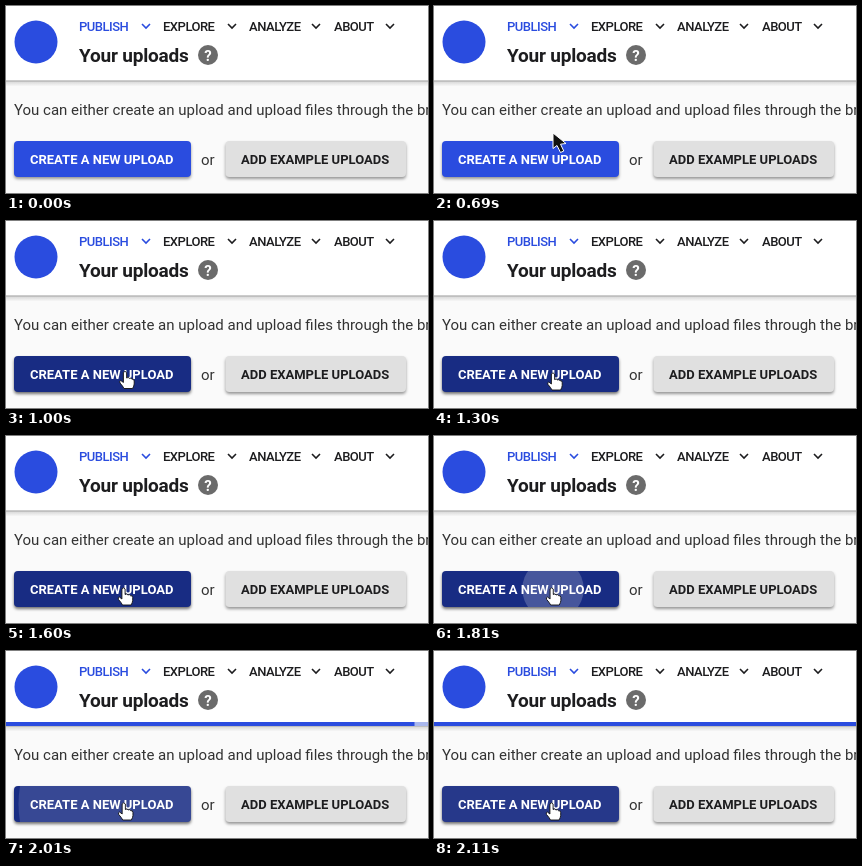
These frames come from a looping animation (422x187 px, 2.21 s). An HTML page:

```html
<!DOCTYPE html>
<html lang="en">
<head>
<meta charset="utf-8">
<style>
  html, body { margin: 0; width: 100%; height: 100%; overflow: hidden; background: #fafafa; }
  svg { display: block; width: 422px; height: 187px; }
  text { font-family: Roboto, "Open Sans", sans-serif; fill: #1d1d1f; }
  .nav { font-size: 13px; font-weight: 500; letter-spacing: -.5px; }
  .title { font-size: 19px; font-weight: 600; letter-spacing: -.2px; }
  .body { font-size: 15px; fill: #333; }
  .label { font-size: 13px; font-weight: 600; }
  .chevron { fill: none; stroke-width: 1.6; }
</style>
</head>
<body>
<svg viewBox="0 0 422 187">
  <defs>
    <filter id="soft" x="-20%" y="-40%" width="140%" height="200%"><feGaussianBlur stdDeviation="1.8"/></filter>
    <linearGradient id="headerShadow" x2="0" y2="1">
      <stop stop-color="#999"/><stop offset=".3" stop-color="#ddd"/><stop offset="1" stop-color="#fafafa"/>
    </linearGradient>
    <clipPath id="buttonClip"><rect x="8" y="135" width="177" height="36" rx="4"/></clipPath>
  </defs>

  <rect width="422" height="187" fill="#fafafa"/>
  <rect width="422" height="75" fill="#fff"/>
  <rect y="74.5" width="422" height="6" fill="url(#headerShadow)"/>
  <circle cx="30" cy="36" r="21.5" fill="#2a4cdf"/>
  <g id="menu"></g>
  <text class="title" x="73" y="56">Your uploads</text>
  <circle cx="202" cy="49" r="10" fill="#6b6b6b"/>
  <text x="202" y="54.5" text-anchor="middle" font-size="15" font-weight="700" style="fill:#fff">?</text>

  <g id="progress">
    <rect y="71" width="422" height="4" fill="#aab8ee"/>
    <rect id="bar" y="71" height="4" fill="#2a4cdf"/>
  </g>

  <text class="body" x="8" y="109">You can either create an upload and upload files through the browser</text>

  <rect id="shadow" x="8" y="137" width="177" height="36" rx="4" filter="url(#soft)"/>
  <rect id="button" x="8" y="135" width="177" height="36" rx="4"/>
  <circle id="ripple" cx="119" cy="153" fill="#fff" clip-path="url(#buttonClip)"/>
  <text class="label" x="24" y="158" style="fill:#fff">CREATE A NEW UPLOAD</text>

  <text class="body" x="195" y="159">or</text>
  <rect x="219.5" y="137" width="180.5" height="36" rx="4" fill-opacity=".4" filter="url(#soft)"/>
  <rect x="219.5" y="135" width="180.5" height="36" rx="4" fill="#e0e0e0"/>
  <text class="label" x="235" y="158">ADD EXAMPLE UPLOADS</text>

  <path id="arrow" d="M0 0V15.5L4 12.5 7.5 19.5 10.8 18 7.5 11.2 13 10.5Z" fill="#111" stroke="#fff" stroke-linejoin="round"/>
  <path id="hand" d="M-1.6 1.5Q0-.8 1.6 1.5V7Q3.4 5.7 4.4 7.4 6.2 6.5 7 8.2 9 7.6 9.2 10V13Q9 15 7.6 17.5H-1Q-3-14.8-1 17.5 -2.2 15-5 12 -6 10-4.2 9.5L-1.6 11.5Z" fill="#fff" stroke="#111" stroke-width=".9" stroke-linejoin="round"/>
</svg>
<script>
const $ = id => document.getElementById(id);
const LOOP = 2210;
const CHANGES = [0, 690, 790, 900, 1000, 1090, 1300, 1600, 1710, 1820, 1920, 2010, 2110];
const POINTER = [[690, 119, 127], [790, 119, 138], [900, 118, 147], [1000, 119, 150],
                 [1300, 119, 151.5], [1600, 117.5, 151.5], [1920, 118, 151.5], [2110, 117.5, 151.5]];
const IDLE = [42, 76, 223], HOVER = [24, 44, 131];

const clamp = v => Math.max(0, Math.min(1, v));
const mix = (a, b, k) => a + (b - a) * k;
const show = (id, on) => $(id).setAttribute("visibility", on ? "visible" : "hidden");
const set = (id, attributes) => {
  for (const name in attributes) $(id).setAttribute(name, attributes[name]);
};

$("hand").setAttribute("d",
  "M-1.6 1.5Q0-.8 1.6 1.5V7Q3.4 5.7 4.4 7.4 6.2 6.5 7 8.2 9 7.6 9.2 10V13Q9 15 7.6 17.5H-1Q-2.2 15-5 12-6 10-4.2 9.5L-1.6 11.5Z");

$("menu").innerHTML = [["PUBLISH", 73, 140], ["EXPLORE", 157, 226], ["ANALYZE", 243, 310], ["ABOUT", 328, 384]]
  .map(([word, x, chevron], i) => {
    const color = i ? "#1d1d1f" : "#2a4cdf";
    return `<text class="nav" x="${x}" y="25" style="fill:${color}">${word}</text>
      <path class="chevron" stroke="${color}" d="M${chevron - 4} 18l4 4 4-4"/>`;
  }).join("");

function pointerAt(t) {
  const next = POINTER.findIndex(p => p[0] > t);
  if (next < 0) return POINTER.at(-1).slice(1);
  if (next === 0) return POINTER[0].slice(1);
  const a = POINTER[next - 1], b = POINTER[next];
  const k = (t - a[0]) / (b[0] - a[0]);
  return [mix(a[1], b[1], k), mix(a[2], b[2], k)];
}

function draw(t) {
  const [x, y] = pointerAt(t);
  const transform = `translate(${x} ${y})`;
  set("arrow", { transform });
  set("hand", { transform });
  show("arrow", t >= 690 && t < 790);
  show("hand", t >= 790);

  const hover = clamp((t - 750) / 180);
  set("button", { fill: `rgb(${IDLE.map((c, i) => mix(c, HOVER[i], hover))})` });
  const pressed = t >= 1820 && t < 2010;
  set("shadow", { y: pressed ? 139 : 137, "fill-opacity": mix(.4, .55, hover) });

  const spread = clamp((t - 1645) / 550);
  set("ripple", {
    r: 114 * (1 - (1 - spread) ** 2.5),
    opacity: .2 * (1 - clamp((t - 1920) / 270))
  });

  show("progress", t >= 1820);
  set("bar", { width: Math.min(422, Math.max(0, (t - 1795) * 1.9)) });
}

function tick() {
  const now = performance.now() % LOOP;
  draw(CHANGES.findLast(time => time <= now));
  requestAnimationFrame(tick);
}
tick();
</script>
</body>
</html>
```
